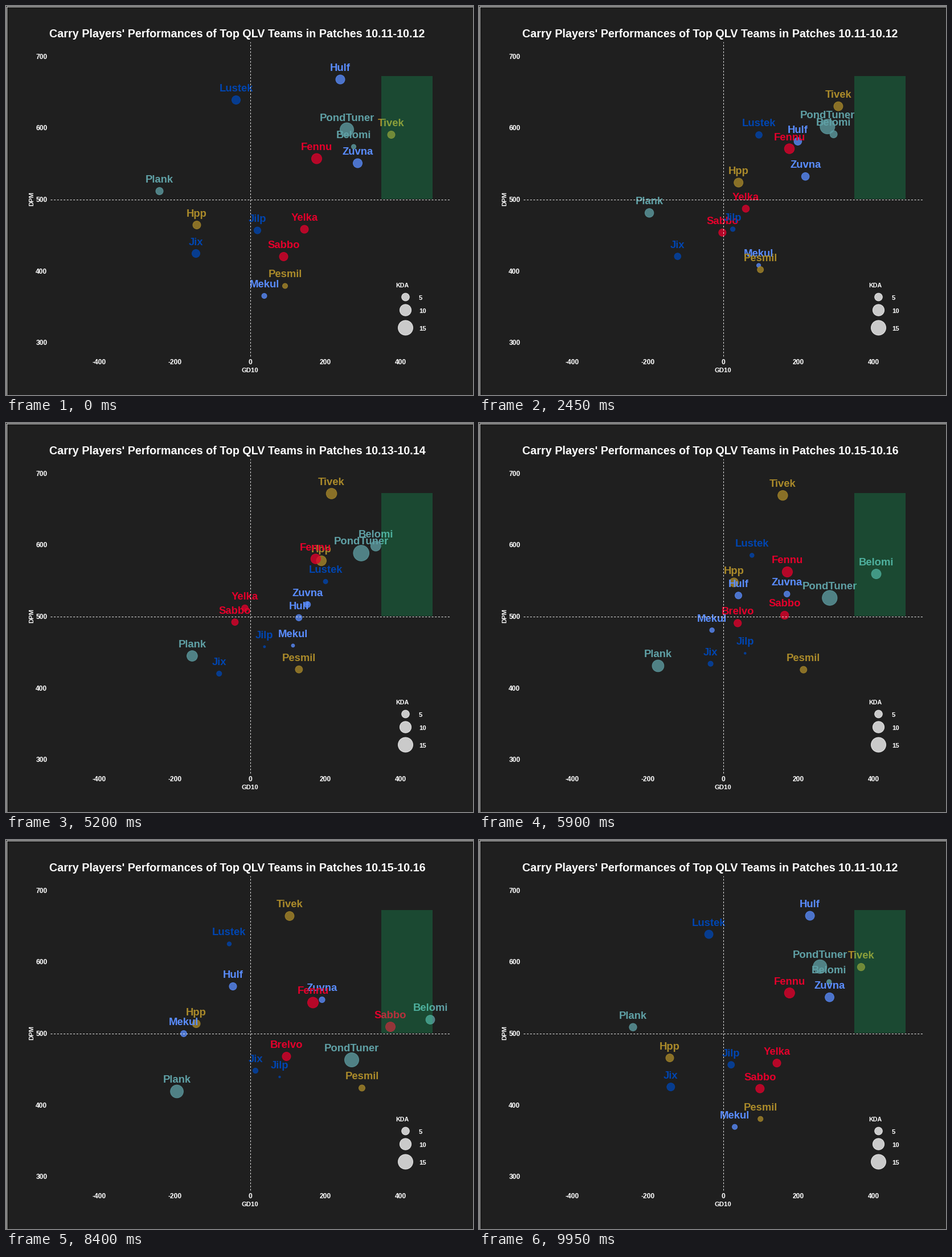
These frames come from a looping animation (820x683 px, 10000 ms). A matplotlib script:

```python
import matplotlib.pyplot as plt
import numpy as np
from matplotlib.animation import FuncAnimation
from matplotlib.colors import to_rgba
from matplotlib.patches import Rectangle

W, H, DPI = 820, 683, 64  # a power of two keeps the pixel size exact
PT = 72 / DPI            # points per pixel
FRAMES, INTERVAL = 200, 50
STARTS = (33, 100, 167)  # frame on which each move begins
MOVE = 33                # frames per move
ALPHA = 0.77

RED, BLUE, GOLD, TEAL, NAVY = "#e4002b", "#5a8dff", "#aa8a2a", "#5fa0a5", "#0045b0"
PATCHES = ("10.11-10.12", "10.13-10.14", "10.15-10.16")

# name, colour, then (x, y, radius) in pixels for each pair of patches
PLAYERS = [
    ("Hpp", GOLD, (335, 384.5, 7.5), (584, 231, 9.5), (334, 320.6, 7.5)),
    ("Sabbo", RED, (487.5, 440, 8), (363.5, 353, 6), (680.9, 324.5, 9)),
    ("Zuvna", BLUE, (617.5, 276, 8.5), (526, 324, 6), (553, 280.6, 5.5)),
    ("Hulf", BLUE, (587, 129, 8.5), (531, 353, 6), (392.6, 261, 7)),
    ("Mekul", BLUE, (453.5, 509, 5), (531, 398.5, 3), (307.6, 334.7, 6)),
    ("Yelka", RED, (524, 392, 7.5), (409.5, 317.5, 6), (491.5, 379.6, 8)),
    ("Jix", NAVY, (333.5, 434.5, 7.5), (365, 445, 5), (441.3, 404.1, 5)),
    ("Plank", TEAL, (269.5, 325, 7), (330.5, 404, 9.5), (301, 445.1, 12)),
    ("Jilp", NAVY, (441.5, 394, 6.5), (450, 389.5, 2.5), (481.7, 416.7, 2)),
    ("Lustek", NAVY, (404, 165, 8), (584.5, 291.5, 4.5), (391.6, 183, 4)),
    ("Belomi", TEAL, (610.5, 247, 4.5), (635.5, 202, 9.5), (749.2, 317.6, 8.5)),
    ("Pesmil", GOLD, (490, 491.5, 5), (498.5, 432.5, 7), (629.2, 433.7, 6)),
    ("Tivek", GOLD, (676.5, 226, 7), (582.5, 123, 10), (492.4, 130.6, 8.5)),
    ("PondTuner", TEAL, (598.5, 217, 12.5), (626, 206, 14.5), (607.3, 391.3, 13)),
    ("Fennu", RED, (545.5, 268, 9.5), (544.5, 232, 9), (538.8, 286, 10)),
]
SUBSTITUTE = {("Yelka", 2): "Brelvo"}
STATES = np.array([p[2:] for p in PLAYERS]).transpose(1, 0, 2)

plt.rcParams["font.family"] = "Liberation Sans"
plt.rcParams["font.weight"] = "bold"

fig = plt.figure(figsize=(W / DPI, H / DPI), dpi=DPI, facecolor="#1f1f1f")
ax = fig.add_axes([0, 0, 1, 1])
ax.set_xlim(0, W)
ax.set_ylim(H, 0)
ax.axis("off")


def write(x, y, text, px, color="white", ha="center", **kw):
    """Place text with its capitals centred on y."""
    return ax.text(x, y + 0.36 * px, text, fontsize=px * PT, color=color,
                   ha=ha, va="baseline", **kw)


def areas(radius):
    return (2 * (np.asarray(radius) - 0.5) * PT) ** 2


def dots(x, y, radius, colors):
    rgba = [to_rgba(c, ALPHA) for c in colors]
    return ax.scatter(x, y, s=areas(radius), facecolors=rgba, edgecolors=rgba,
                      linewidths=PT, zorder=2)


def state_at(frame):
    """Interpolated dots and the index of the nearest state."""
    for i, start in reversed(list(enumerate(STARTS))):
        if frame >= start:
            t = min((frame - start) / MOVE, 1)
            after = (i + 1) % 3
            mix = STATES[i] * (1 - t) + STATES[after] * t
            return mix, after if t > 0.5 else i
    return STATES[0], 0


# Frame, zone and axes
ax.add_patch(Rectangle((0.5, 0.5), W - 1, H - 1, fill=False, ec="white", lw=PT))
ax.add_patch(Rectangle((659, 123), 90, 216, fc=(0.05, 0.96, 0.51, 0.2), lw=0, zorder=4))
dash = dict(color="white", lw=0.9 * PT, ls=(0, (3.3, 3)), zorder=5)
ax.plot([78, 779], [339.5, 339.5], **dash)
ax.plot([428.5, 428.5], [615, 63], **dash)

for k in range(5):
    write(72.5, 88.5 + 125.65 * k, str(700 - 100 * k), 12, ha="right")
    write(164 + 132.2 * k, 625, str(200 * k - 400), 12)
write(428.5, 638.5, "GD10", 11.3)
write(48, 334.5, "DPM", 11.3, rotation=90, rotation_mode="anchor")

# Size legend
write(684, 490.5, "KDA", 10.6, ha="left")
legend_y = (511, 534, 565)
dots([701.5] * 3, legend_y, (7.3, 10.6, 13.5), ["white"] * 3)
for value, y in zip((5, 10, 15), legend_y):
    write(725, y + 0.7, str(value), 11.3, ha="left")

title = write(76, 48, "", 19.7, ha="left")
points = dots(*STATES[0].T, [p[1] for p in PLAYERS])
labels = [write(0, 0, p[0], 18.5, p[1], zorder=3) for p in PLAYERS]


def update(frame):
    now, nearest = state_at(frame)
    title.set_text("Carry Players' Performances of Top QLV Teams in Patches "
                   + PATCHES[nearest])
    points.set_offsets(now[:, :2])
    points.set_sizes(areas(now[:, 2]))
    for label, player, (x, y, _) in zip(labels, PLAYERS, now):
        label.set_position((x, y - 15))
        label.set_text(SUBSTITUTE.get((player[0], nearest), player[0]))
    return [title, points, *labels]


anim = FuncAnimation(fig, update, frames=FRAMES, interval=INTERVAL,
                     repeat=True, repeat_delay=0, blit=False)
plt.show()
```
